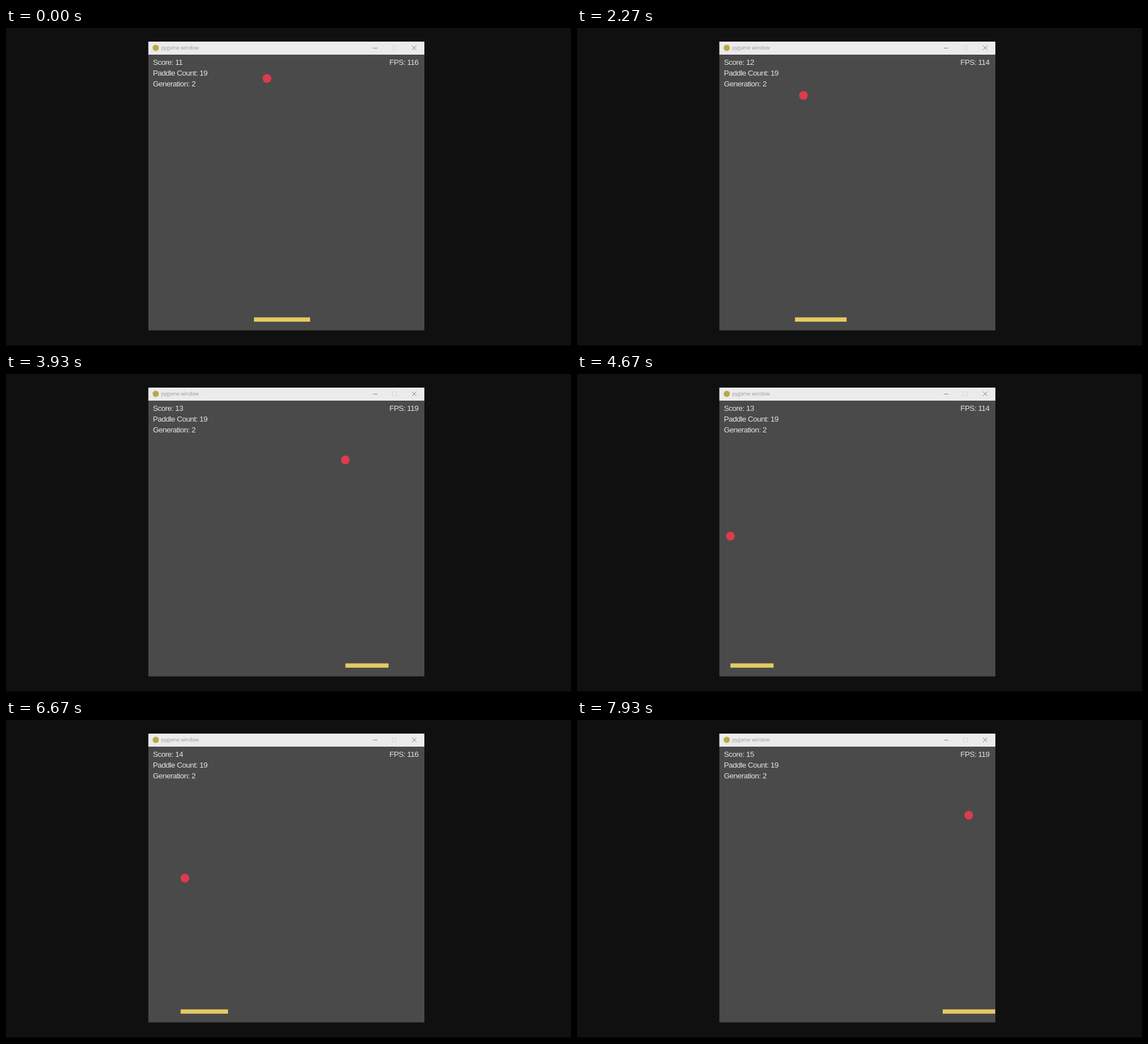
An HTML page for the animation above (8000 ms loop, 998 by 561 pixels).

```html
<!DOCTYPE html>
<html lang="en">
<head>
<meta charset="utf-8">
<title>pygame window</title>
<style>
  html, body { margin: 0; width: 100%; height: 100%; overflow: hidden; background: #101010; }
  svg { display: block; width: 100%; height: 100%; }
  .hud { font: 13.5px "Liberation Sans", Arial, sans-serif; letter-spacing: -.5px; fill: #e4e4e4; }
  .title { font: 8.8px "Open Sans", sans-serif; fill: #999; }
</style>
</head>
<body>
<svg viewBox="0 0 998 561">
  <rect width="998" height="561" fill="#101010"/>
  <rect y="560" width="998" height="1" fill="#000"/>
  <rect x="251.5" y="24" width="487.5" height="509.5" fill="#4a4a4a"/>
  <rect x="251.5" y="24" width="487.5" height="23" fill="#ebebeb"/>
  <circle cx="264.5" cy="35" r="5.5" fill="#b8aa45"/>
  <text class="title" x="274" y="38.3">pygame window</text>
  <g fill="none" stroke="#858585">
    <path d="M648 35.5h8M717 31l8 8m0-8l-8 8"/>
    <rect x="682.5" y="31.5" width="7" height="7" stroke="#d8d8d8"/>
  </g>
  <g class="hud">
    <text id="score" x="259.5" y="65"></text>
    <text x="259.5" y="84">Paddle Count: 19</text>
    <text x="259.5" y="103">Generation: 2</text>
    <text id="fps" x="677.3" y="65"></text>
  </g>
  <rect id="paddle" y="510.5" height="7.6" fill="#e3cb64"/>
  <circle id="ball" r="7.7" fill="#dc3c4c"/>
</svg>
<script>
const LOOP = 8000, STEP = 1000 / 15;
const LEFT = 264, RIGHT = 731, TOP = 54.5, BOTTOM = 502.5;
const PADDLE_WIDTH = 76.2, PADDLE_MIN = 259, PADDLE_MAX = 662.5;

// step, distance travelled along each axis, frame rate, reach ahead of the ball when moving left
const keys = [
  [0, 0, 116, 23], [17, 498, 113, 15], [34, 995, 114, 15], [48, 1401, 119, 15],
  [70, 2058, 114, 0], [100, 2947, 116, 7.5], [119, 3505, 119, 46]
];

const [score, fps, paddle, ball] =
  ["score", "fps", "paddle", "ball"].map(id => document.getElementById(id));

const clamp = (v, min, max) => Math.max(min, Math.min(max, v));

// Position of a point bouncing between two walls, phase 0 being the first wall.
function bounce(phase, min, max) {
  const span = max - min;
  const p = ((phase % (2 * span)) + 2 * span) % (2 * span);
  return { pos: min + (p < span ? p : 2 * span - p), forward: p < span };
}

function draw(time) {
  const step = Math.floor((time % LOOP + 3.4) / STEP);
  let i = 0;
  while (i < keys.length - 2 && step >= keys[i + 1][0]) i++;
  const a = keys[i], b = keys[i + 1];
  const part = (step - a[0]) / (b[0] - a[0]);
  const mix = n => a[n] + (b[n] - a[n]) * part;

  const travelled = mix(1);
  const x = bounce(travelled - 197, LEFT, RIGHT);
  const yPhase = travelled - 34.5;
  const y = bounce(yPhase, TOP, BOTTOM);
  ball.setAttribute("cx", x.pos);
  ball.setAttribute("cy", y.pos);

  // The bar is the union of many overlapping paddles that follow the ball.
  const reach = x.forward ? 38 : (part < .5 ? a : b)[3];
  const lag = x.forward ? 7.6 : 0;
  const first = clamp(x.pos - reach, PADDLE_MIN, PADDLE_MAX);
  const last = clamp(x.pos - lag, PADDLE_MIN, PADDLE_MAX);
  paddle.setAttribute("x", first);
  paddle.setAttribute("width", last - first + PADDLE_WIDTH);

  const height = BOTTOM - TOP;
  score.textContent = "Score: " + (11 + Math.floor((yPhase + height) / (2 * height)));
  fps.textContent = "FPS: " + Math.round(mix(2) + 2 * Math.sin(9 * Math.PI * part));
}

const start = performance.now();
function tick() {
  draw(performance.now() - start);
  requestAnimationFrame(tick);
}
tick();
</script>
</body>
</html>
```
